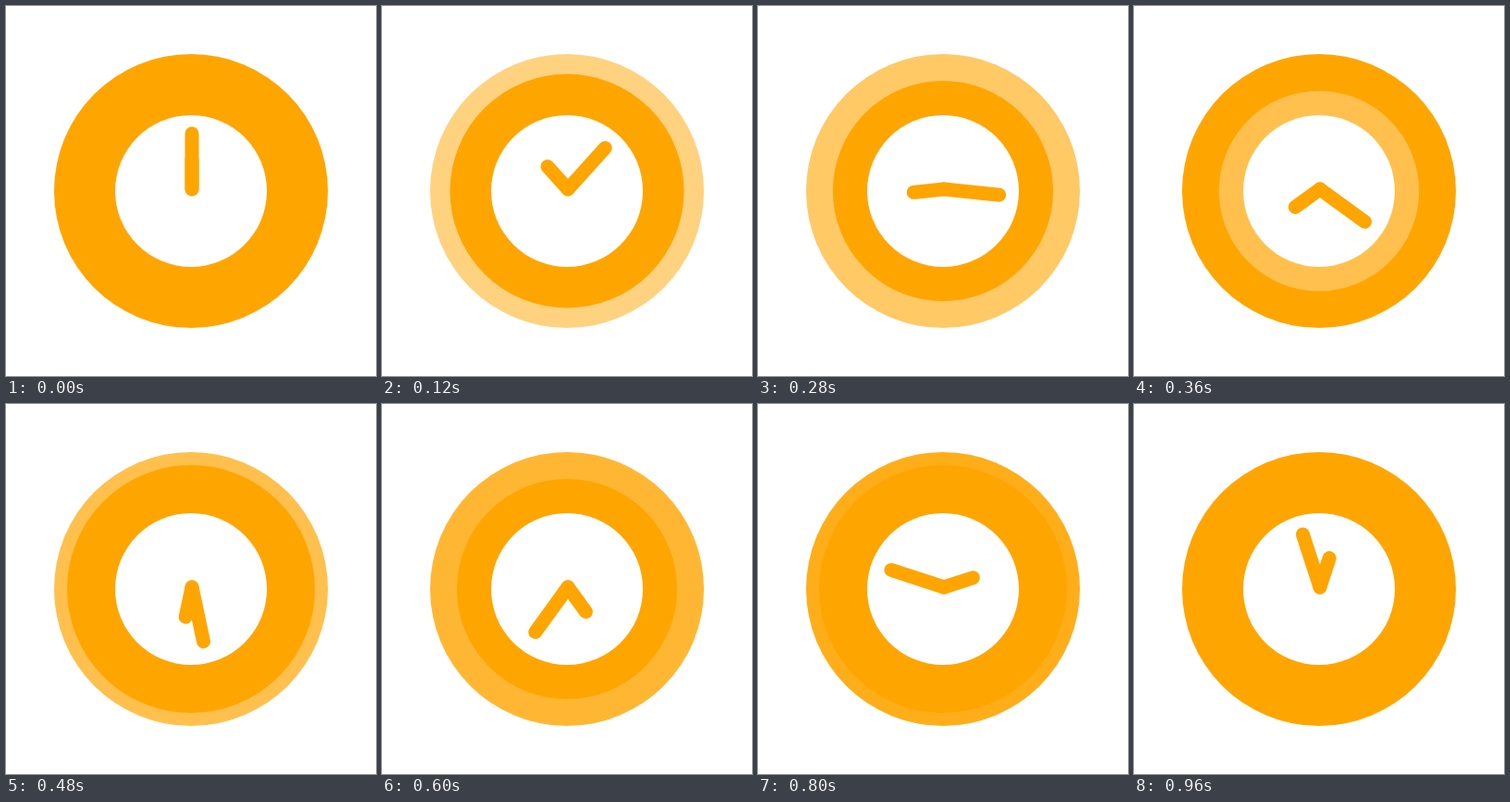
Recreate the animation shown at these times as an HTML page. Size 400 by 400 pixels, loop 1 s.

```html
<!DOCTYPE html>
<html lang="en">
<head>
<meta charset="utf-8">
<title>Clock pulse</title>
<style>
  html, body { margin: 0; width: 100%; height: 100%; overflow: hidden; background: #fff; }
  svg { display: block; width: 100vw; height: 100vh; }
  .hand { stroke: #ffa500; stroke-width: 15; stroke-linecap: round; }
</style>
</head>
<body>
<svg viewBox="0 0 400 400">
  <circle cx="200" cy="200" r="148" fill="#ffa500"/>
  <circle id="ripple" cx="200" cy="200" r="86.4" fill="none" stroke="#fff" stroke-width="24"/>
  <circle cx="200" cy="200" r="82" fill="#fff"/>
  <line id="minute" class="hand" x1="201" y1="198" x2="201" y2="138"/>
  <line id="hour" class="hand" x1="201" y1="198" x2="201" y2="165"/>
</svg>
<script>
  const LOOP = 1000, STEP = 40, TICKS = 60, PULSE = 10;
  const get = id => document.getElementById(id);
  const ripple = get('ripple'), minute = get('minute'), hour = get('hour');

  const turn = (hand, deg) => hand.setAttribute('transform', `rotate(${deg} 201 198)`);

  function draw(now) {
    // the picture holds for STEP ms and shows the last whole 1/60 s tick
    const step = Math.floor((now % LOOP) / STEP);
    const tick = Math.floor(step * STEP * TICKS / LOOP);
    const angle = tick * 360 / TICKS;
    turn(minute, angle);
    turn(hour, -angle);

    // each pulse doubles the ring, and each is fainter than the one before
    const last = (tick + TICKS - 1) % TICKS;
    const pulse = Math.floor(last / PULSE);
    const scale = 1 + (last % PULSE + 1) / PULSE;
    ripple.setAttribute('r', 86.4 * scale);
    ripple.setAttribute('stroke-width', 24 * scale);
    ripple.setAttribute('stroke-opacity', (5 - pulse) / 10);
  }

  function loop() {
    draw(performance.now());
    requestAnimationFrame(loop);
  }
  loop();
</script>
</body>
</html>
```
